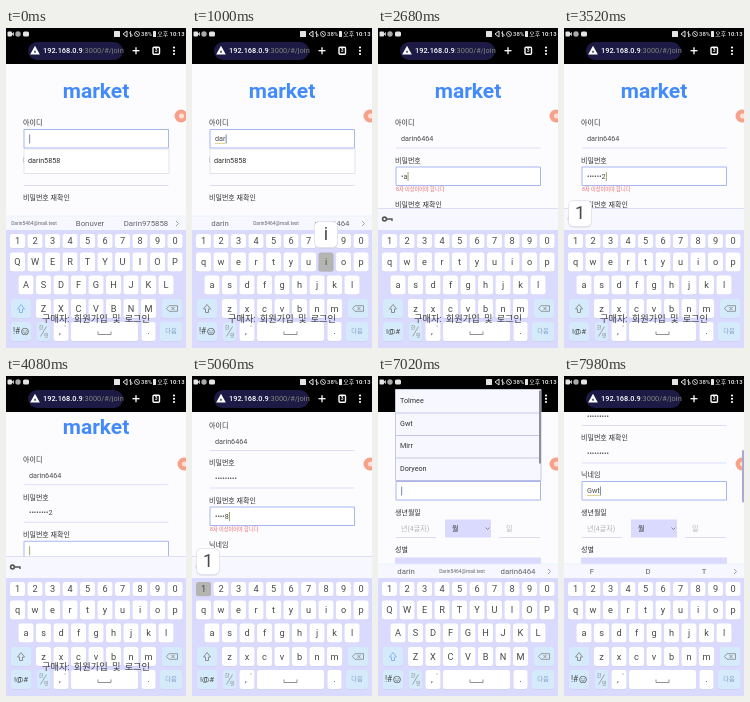
Animation, 180 px wide and 320 px high, one loop 8 s. Source, as an HTML page with a canvas:

```html
<!DOCTYPE html>
<html lang="ko">
<head>
<meta charset="utf-8">
<title>Sign-up form</title>
<style>
html, body { margin: 0; width: 100%; height: 100%; overflow: hidden; background: #fff; }
canvas { display: block; width: 180px; height: 320px; }
</style>
</head>
<body>
<canvas id="stage"></canvas>
<script>
const LOOP = 8000, W = 180, H = 320;
const FONT = 'Roboto, "Noto Sans CJK KR", "Noto Sans CJK JP", sans-serif';
const INK = '#303030', VALUE = '#4c4c4c', LINE = '#d0d0f4', LAVENDER = '#dadaff', PAGE = '#fcfcff', PALE = '#f7f7ff';
const canvas = document.getElementById('stage');
const ctx = canvas.getContext('2d');
const ratio = window.devicePixelRatio || 1;
canvas.width = W * ratio;
canvas.height = H * ratio;

const EMAIL = 'Darin5464@mail.test';
const SAVED_ID = 'darin5858';
const NICKNAMES = ['Tolmee', 'Gwt', 'Mirr', 'Doryeon'];

// Each field is focused at `focus`; its keys land every `step` ms from `start`.
const fields = [
  { label: '아이디', y: 96, value: 'darin6464', focus: 0, start: 420, step: 196 },
  { label: '비밀번호', y: 133.5, value: 'dar781212', focus: 2250, start: 2450, step: 160, secret: true },
  { label: '비밀번호 재확인', y: 171, value: 'dar781212', focus: 3950, start: 4350, step: 150, secret: true },
  { label: '닉네임', y: 208, value: 'Gwt', focus: 6400, start: 7250, step: 230 }
];
const scrollKeys = [[0, 0], [4000, 0], [4250, 45.5], [5700, 45.5], [5900, 102], [6450, 102], [6650, 108], [LOOP, 108]];

function text(s, x, y, size, color = INK, align = 'left', weight = 400) {
  ctx.font = `${weight} ${size}px ${FONT}`;
  ctx.fillStyle = color;
  ctx.textAlign = align;
  ctx.textBaseline = 'middle';
  ctx.fillText(s, x, y);
  return ctx.measureText(s).width;
}

function box(x, y, w, h, fill, radius = 0, stroke, width = 1) {
  ctx.beginPath();
  ctx.roundRect(x, y, w, h, radius);
  if (fill) { ctx.fillStyle = fill; ctx.fill(); }
  if (stroke) { ctx.strokeStyle = stroke; ctx.lineWidth = width; ctx.stroke(); }
}

function path(points, color, width = 1, closed = false) {
  ctx.beginPath();
  points.forEach(([x, y]) => ctx.lineTo(x, y));
  if (closed) ctx.closePath();
  ctx.strokeStyle = color;
  ctx.lineWidth = width;
  ctx.stroke();
}

function dot(x, y, r, color) {
  ctx.beginPath();
  ctx.arc(x, y, r, 0, 7);
  ctx.fillStyle = color;
  ctx.fill();
}

function scrollAt(t) {
  const i = scrollKeys.findIndex(k => k[0] > t);
  const [t0, a] = scrollKeys[i - 1], [t1, b] = scrollKeys[i];
  const u = (t - t0) / (t1 - t0);
  return a + (b - a) * u * u * (3 - 2 * u);
}

const typedCount = (f, t) =>
  Math.max(0, Math.min(f.value.length, Math.floor((t - f.start) / f.step) + 1));

function shownValue(f, t) {
  const n = typedCount(f, t);
  if (!f.secret || !n) return f.value.slice(0, n);
  const fresh = t - (f.start + (n - 1) * f.step) < 1000;
  return fresh ? '•'.repeat(n - 1) + f.value[n - 1] : '•'.repeat(n);
}

function pressedKey(f, t) {
  const n = typedCount(f, t);
  const left = f.start + n * f.step - t;
  return n < f.value.length && left < 80 ? { char: f.value[n], left } : null;
}

function drawLabel(label, y) {
  text(label, 17, y - .6, 7, INK, 'left', 500);
}

function drawField(f, y, t, focused) {
  drawLabel(f.label, y);
  const top = y + 5.5, value = shownValue(f, t);
  if (focused) box(18, top, 144.5, 18.5, '#fff', 0, '#a8b6f0');
  else path([[18, top + 18.5], [162.5, top + 18.5]], LINE, .7);
  const width = text(value, 23, top + 9.5, 7.2, VALUE);
  if (!focused) return;
  if (width && !f.secret) box(23, top + 13.5, width, .7, '#d5c060');
  box(23.3 + width, top + 5, .8, 9, f.secret ? '#8b8b45' : '#5a6a9a');
}

function drawPage(t, active) {
  box(0, 0, W, H, PAGE);
  const scroll = scrollAt(t);
  text('market', 90, 63.5 - scroll, 21, '#438bfb', 'center', 700);
  let push = 0;
  for (const f of fields) {
    const focused = f === active, y = f.y - scroll + push, n = typedCount(f, t);
    drawField(f, y, t, focused);
    if (focused && f.secret && n > 0 && n < 8) {
      text('8자 이상이어야 합니다', 18, y + 27.5, 5.2, '#ee6c6c');
      push = 7;
    }
  }
  const birth = 245.5 - scroll + push;
  drawLabel('생년월일', birth);
  text('년(4글자)', 23, birth + 15, 7, '#b3b3b3');
  text('일', 128, birth + 15, 7, '#b3b3b3');
  path([[18, birth + 24], [58, birth + 24]], LINE, .7);
  path([[121, birth + 24], [162, birth + 24]], LINE, .7);
  box(67, birth + 6, 46, 18, LAVENDER);
  text('월', 74, birth + 15, 7);
  path([[107.5, birth + 14], [109.5, birth + 16], [111.5, birth + 14]], '#666', .7);
  drawLabel('성별', birth + 37.5);
  box(17, birth + 44, 146, 18, LAVENDER);

  const bubbleX = 175 + 3 * Math.min(1, t / 300);
  dot(bubbleX, 88, 6.5, '#f6a28a');
  dot(bubbleX + .5, 88, 2.5, '#fde0d8');
  const scrolling = (t > 5700 && t < 6300) || t > 7800;
  if (scrolling) box(178, 18 + scroll * .52, 2, 52, '#a9a9d4');
}

function drawBrowserBar() {
  box(0, 0, W, 36, '#000');
  box(22, 14, 95, 18, '#1d1a45', 9);
  path([[29, 20], [32, 25.5], [26, 25.5]], '#fff', 2.2, true);
  const w = text('192.168.0.9', 37, 23, 7.4, '#fff', 'left', 500);
  text(':3000/#/join', 37 + w, 23, 7.4, '#85857c');
  path([[126.5, 22.7], [133.5, 22.7]], '#fff', 1.3);
  path([[130, 19.2], [130, 26.2]], '#fff', 1.3);
  box(147, 19.3, 6.5, 7, null, 1, '#fff', 1.4);
  text('3', 150.3, 23, 5, '#fff', 'center', 700);
  for (const y of [19.5, 22.8, 26]) dot(168, y, 1.1, '#fff');
}

function drawStatusBar() {
  const icon = '#e4e4e4';
  box(0, 0, W, 12, '#000');
  box(1.5, 3.5, 4.5, 5, icon, 1);
  path([[6, 6], [7.5, 4.5], [7.5, 7.5]], icon, .8, true);
  dot(12, 6, 2.7, '#aaa');
  box(17, 3.5, 6, 5, icon, 1.5);
  box(108, 3, 6, 6, icon, .5);
  path([[117, 6], [121, 3], [121, 9]], icon, 1, true);
  path([[124.5, 3], [124.5, 9], [126.5, 7], [123, 4.5]], icon, .8);
  box(128.5, 3.5, 5, 5, null, 2.5, icon, .8);
  path([[129.5, 4.5], [132.5, 7.5]], icon, .8);
  text('38%', 135, 6.2, 6, icon, 'left', 500);
  box(147, 3, 3, 6, icon, .5);
  text('오후 10:13', 178.5, 6.2, 5.9, '#fff', 'right', 500);
}

function drawIdChoices(typed) {
  if (!SAVED_ID.startsWith(typed)) return;
  box(18, 121, 145, 24.5, '#fff', 0, '#dcdcea', .8);
  text(SAVED_ID, 22, 132.5, 7.2);
}

function drawNicknames(typed) {
  const rows = NICKNAMES.filter(n => n.startsWith(typed) && n !== typed);
  if (!rows.length) return;
  const rowH = 22.5, top = 104.5 - rows.length * rowH;
  box(17.5, top - 1, 145.5, 105.5 - top, PALE, 0, '#c8c8dc');
  rows.forEach((name, i) => {
    text(name, 22, top + rowH * (i + .5) - .5, 7.2);
    path([[18, top + rowH * (i + 1)], [163, top + rowH * (i + 1)]], '#b9b9e2', .8);
  });
  if (rows.length > 1) box(161, top, 2, 73, '#8d8d9c');
}

function drawSuggestions(active, typed) {
  const top = active.secret ? 180.5 : 188;
  box(0, top, W, 203 - top, PALE);
  path([[0, top], [W, top]], active.secret ? '#d6d6f6' : '#e4eefb', .8);
  if (active.secret) {
    dot(6.5, 191, 2.7, '#555');
    dot(6.5, 191, 1.1, '#fff');
    path([[9, 191], [14, 191], [14, 193]], '#555', 1.4);
    return;
  }
  let words = ['darin', EMAIL, 'darin6464'];
  if (active === fields[0] && !typed) words = [EMAIL, 'Bonuver', 'Darin975858'];
  if (active === fields[3] && typed) words = ['F', 'D', 'T'];
  words.forEach((word, i) =>
    text(word, 28 + 56 * i, 195.5, word.length > 12 ? 4.9 : 7.8, '#62626c', 'center'));
  path([[170, 193], [172.5, 195.5], [170, 198]], '#888', .8);
}

const letterRows = [
  { keys: '1234567890', x: 11.5, y: 213, h: 14 },
  { keys: 'qwertyuiop', x: 11.5, y: 234, h: 19 },
  { keys: 'asdfghjkl', x: 20, y: 257, h: 19 },
  { keys: 'zxcvbnm', x: 37.5, y: 280.5, h: 19 }
];

function drawKeyboard(upper, secret, press) {
  const special = '#d5ebfb', cap = '#fff', pitch = 17.5, bottom = 303.5;
  const ink = '#484848', soft = '#858585';
  box(0, 202, W, H - 202, LAVENDER);
  const key = (x, y, w, h, fill) => {
    box(x - w / 2, y - h / 2 + .6, w, h, '#c9c9ec', 2.5);
    box(x - w / 2, y - h / 2, w, h, fill, 2.5);
  };
  let popup;
  for (const row of letterRows) {
    [...row.keys].forEach((char, i) => {
      const x = row.x + i * pitch;
      const hit = press && press.char.toLowerCase() === char;
      if (hit) popup = { x, y: row.y - 27.5 };
      key(x, row.y, 15, row.h, hit && press.left < 45 ? '#b4b4b0' : cap);
      text(upper ? char.toUpperCase() : char, x, row.y + .5, 9.2, ink, 'center');
    });
  }
  key(15, 280.5, 20, 19, special);
  path([[15, 276.5], [18.5, 281], [16.5, 281], [16.5, 284.5], [13.5, 284.5], [13.5, 281], [11.5, 281]],
    upper ? '#7db3ea' : soft, .9, true);
  key(166, 280.5, 20, 19, special);
  path([[160.5, 280.5], [163, 277.7], [171.5, 277.7], [171.5, 283.3], [163, 283.3]], soft, .8, true);
  path([[165.5, 279], [168.5, 282]], soft, .8);
  path([[168.5, 279], [165.5, 282]], soft, .8);

  key(15, bottom, 20, 19, special);
  if (secret) text('!@#', 15, bottom, 8, ink, 'center');
  else {
    text('!#', 10.5, bottom, 8.2, ink, 'center');
    dot(19, bottom, 3.6, ink);
    dot(19, bottom, 2.9, special);
    dot(17.8, bottom - .8, .5, ink);
    dot(20.2, bottom - .8, .5, ink);
    path([[17.5, bottom + .9], [19, bottom + 1.8], [20.5, bottom + .9]], ink, .7);
  }
  key(37.5, bottom, 13, 19, special);
  text('한', 35, bottom - 3.5, 5, soft, 'center');
  path([[34.5, bottom + 5], [40.5, bottom - 5]], soft, .7);
  text('영', 40, bottom + 4, 5, soft, 'center');
  key(55, bottom, 15, 19, cap);
  text(',', 54, bottom, 9, ink, 'center');
  text('°', 59, bottom - 4, 6, soft, 'center');
  key(98.5, bottom, 67, 19, cap);
  path([[92, bottom], [92, bottom + 3], [105, bottom + 3], [105, bottom]], soft, .9);
  key(142.5, bottom, 14, 19, cap);
  text('.', 142.5, bottom, 9, ink, 'center');
  key(165, bottom, 22, 19, special);
  text('다음', 165, bottom, 6.2, '#7d9cc4', 'center');

  if (!popup) return;
  const x = Math.max(16, Math.min(164, popup.x));
  box(x - 11.5, popup.y - 12.5, 23, 26.5, '#d4d4e4', 5);
  box(x - 11.5, popup.y - 13, 23, 26, '#fff', 5, '#e0e0ea', .8);
  text(press.char, x, popup.y + .5, 18, ink, 'center');
}

function drawCaption() {
  ctx.wordSpacing = '2px';
  text('구매자: 회원가입 및 로그인', 90, 291, 9.2, '#3c3c3c', 'center');
  ctx.wordSpacing = '0px';
}

function draw(t) {
  ctx.setTransform(ratio, 0, 0, ratio, 0, 0);
  const active = fields.filter(f => t >= f.focus).pop();
  const typed = active.value.slice(0, typedCount(active, t));
  drawPage(t, active);
  drawBrowserBar();
  if (active === fields[0]) drawIdChoices(typed);
  if (active === fields[3] && t > 6650) drawNicknames(typed);
  drawStatusBar();
  drawSuggestions(active, typed);
  drawKeyboard(!active.secret && !typed, active.secret, pressedKey(active, t));
  if (t < 4100) drawCaption();
}

function frame() {
  draw(performance.now() % LOOP);
  requestAnimationFrame(frame);
}
frame();
</script>
</body>
</html>
```
